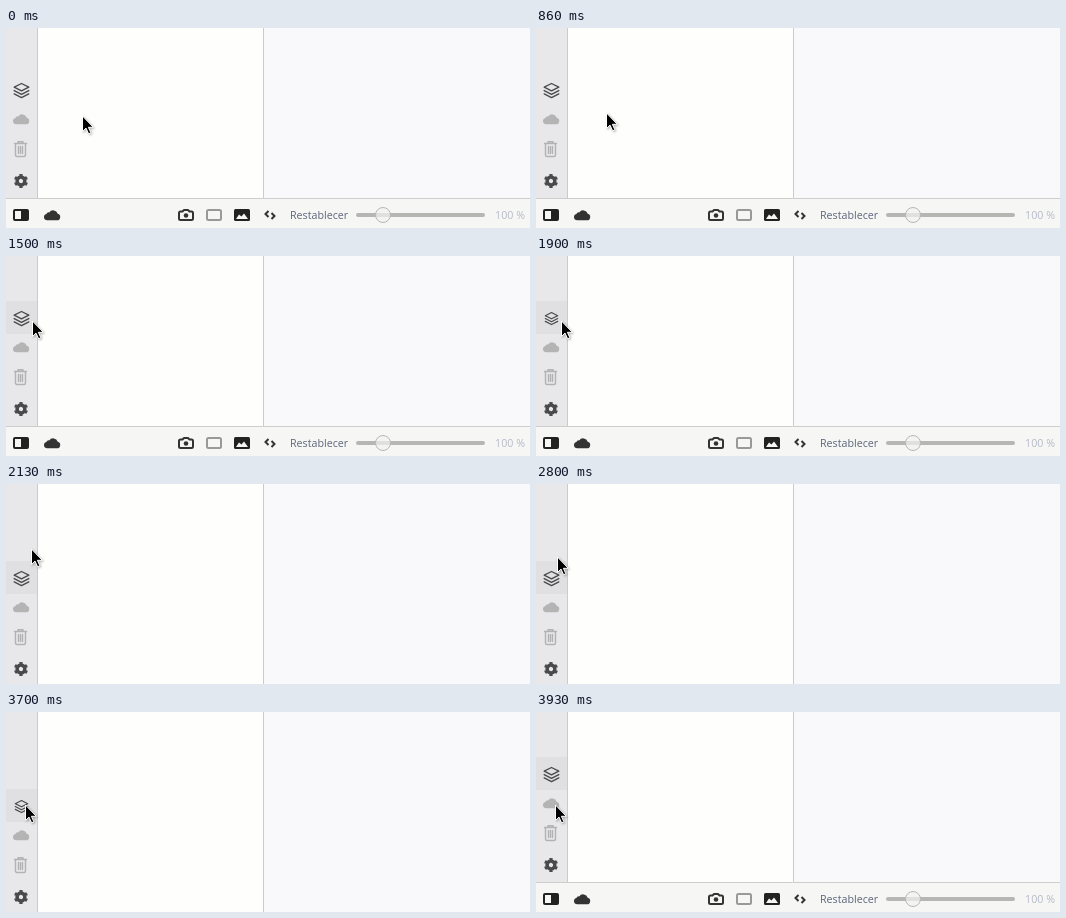
Recreate the animation shown at these times as an HTML page. Size 524 px wide and 200 px high, loop 4730 ms.

```html
<!DOCTYPE html>
<html lang="es">
<head>
<meta charset="utf-8">
<style>
  html, body { margin: 0; width: 100%; height: 100%; overflow: hidden; background: #f9f9fc; }
  svg { display: block; }
  text { font: 10.7px "Open Sans", sans-serif; }
  .line { fill: none; stroke-width: 1.4; stroke-linejoin: round; stroke-linecap: round; }
  .dark { stroke: #4a4a4b; }
  .pale { stroke: #b2b2b3; }
  #pointer { filter: drop-shadow(1px 1px 1px rgba(0, 0, 0, .3)); }
</style>
</head>
<body>
<svg width="524" height="200" viewBox="0 0 524 200">
  <defs>
    <path id="cloud" d="M-4.8 5.3A3.2 3.2 0 0 1-5.6-1A2.6 2.6 0 0 1-2.8-2.6A4.8 4.8 0 0 1 5.7-1.2A3.3 3.3 0 0 1 4.8 5.3Z"/>
  </defs>
  <rect width="31" height="200" fill="#e8e8eb"/>
  <rect x="32" width="225" height="200" fill="#fefefd"/>
  <path d="M31.5 0V200M257.5 0V200" stroke="#cbcbca"/>

  <g id="tools">
    <rect id="hover" y="45" width="31" height="33" fill="#e0e0e2"/>
    <g transform="translate(15.5 62.5)">
      <g id="layers" class="line dark">
        <path d="M0-7L7.3-3.3L0 .4L-7.3-3.3Z"/>
        <path d="M-7.3 .1L0 3.8L7.3 .1M-7.3 3.4L0 7.1L7.3 3.4"/>
      </g>
    </g>
    <use href="#cloud" x="15" y="91" fill="#b4b4b5"/>
    <path class="line pale" d="M8.5 115.5H20.5M12 115V113.7H17V115M9.5 116V127Q9.5 128.5 11 128.5H18Q19.5 128.5 19.5 127V116M12.5 118.5V125.5M14.5 118.5V125.5M16.5 118.5V125.5"/>
    <g transform="translate(15 153) rotate(15)" fill="none" stroke="#4a4a4b">
      <circle r="3.9" stroke-width="3.5"/>
      <circle r="5.9" stroke-width="2.4" pathLength="12" stroke-dasharray="1 1"/>
    </g>
  </g>

  <g id="bar">
    <rect y="170" width="524" height="32" fill="#f6f6f5"/>
    <path d="M0 170.5H524" stroke="#cdcdcc"/>
    <rect x="8" y="182" width="14" height="10" rx="1" fill="none" stroke="#222" stroke-width="2"/>
    <path d="M15 182H22V192H15Z" fill="#222"/>
    <use href="#cloud" x="46" y="187" fill="#333"/>
    <g fill="none" stroke="#333" stroke-width="2">
      <path d="M174.5 183.5H176.5L178 182H182L183.5 183.5H185.5Q187 183.5 187 185V190.5Q187 192 185.5 192H174.5Q173 192 173 190.5V185Q173 183.5 174.5 183.5Z" stroke-linejoin="round"/>
      <circle cx="180" cy="187.5" r="2.3" fill="#333" stroke="none"/>
      <rect x="201" y="182" width="14" height="10" rx="1.5" stroke="#999"/>
      <path d="M262.5 183L259.5 186L262.5 189M265.5 185L268.5 188L265.5 191"/>
    </g>
    <rect x="228" y="181" width="16" height="12" rx="1.5" fill="#222"/>
    <path d="M230 191L233 186.5L235.5 188.5L238 185.5L242 191Z" fill="#f6f6f5"/>
    <text x="284" y="191" fill="#5c6679">Restablecer</text>
    <rect x="350" y="185" width="129" height="4" rx="2" fill="#b6b6b2"/>
    <circle cx="377" cy="187" r="7.5" fill="#f2f2f1" fill-opacity=".7" stroke="#b8b8b6"/>
    <text x="519" y="191" text-anchor="end" fill="#b6bac8">100 %</text>
  </g>

  <path id="pointer" d="M.5 0V15.5L4 12.1L6.6 17.8L8.9 16.8L6.4 11.3H11.3Z" fill="#000" stroke="#fff"/>
</svg>
<script>
const LOOP = 4730, SLIDE = 32;
const [tools, bar, hover, layers, pointer] =
  ["tools", "bar", "hover", "layers", "pointer"].map(id => document.getElementById(id));

// time, x, y
const path = [
  [770, 76, 88], [1160, 49, 77], [1300, 35, 71], [1500, 26, 65], [1690, 26, 65], [1700, 25, 65],
  [2630, 25, 65], [2800, 21, 73], [3160, 19, 91], [3200, 19, 93]
];

const move = (el, x, y) => el.setAttribute("transform", `translate(${Math.round(x)} ${Math.round(y)})`);
const within = (t, start, end) => t >= start && t < end;

function easeOut(t, start, end) {
  const p = Math.min(1, Math.max(0, (t - start) / (end - start)));
  return 1 - (1 - p) ** 2;
}

function pointerAt(t) {
  const next = path.findIndex(key => key[0] > t);
  if (next === 0) return path[0].slice(1);
  if (next < 0) return path[path.length - 1].slice(1);
  const [a, b] = [path[next - 1], path[next]];
  const p = (t - a[0]) / (b[0] - a[0]);
  return [1, 2].map(i => a[i] + (b[i] - a[i]) * p);
}

function draw(now) {
  const t = now % LOOP;
  const offset = SLIDE * (easeOut(t, 1980, 2130) - easeOut(t, 3780, 3930));
  const pressed = within(t, 1900, 2000) || within(t, 3700, 3800);
  move(tools, 0, offset);
  move(bar, 0, offset);
  move(pointer, ...pointerAt(t));
  layers.setAttribute("transform", `scale(${pressed ? 0.85 : 1})`);
  hover.setAttribute("opacity", t < 1400 ? 0 : 1);
}

const start = performance.now();
function tick() {
  draw(performance.now() - start);
  requestAnimationFrame(tick);
}
tick();
</script>
</body>
</html>
```
